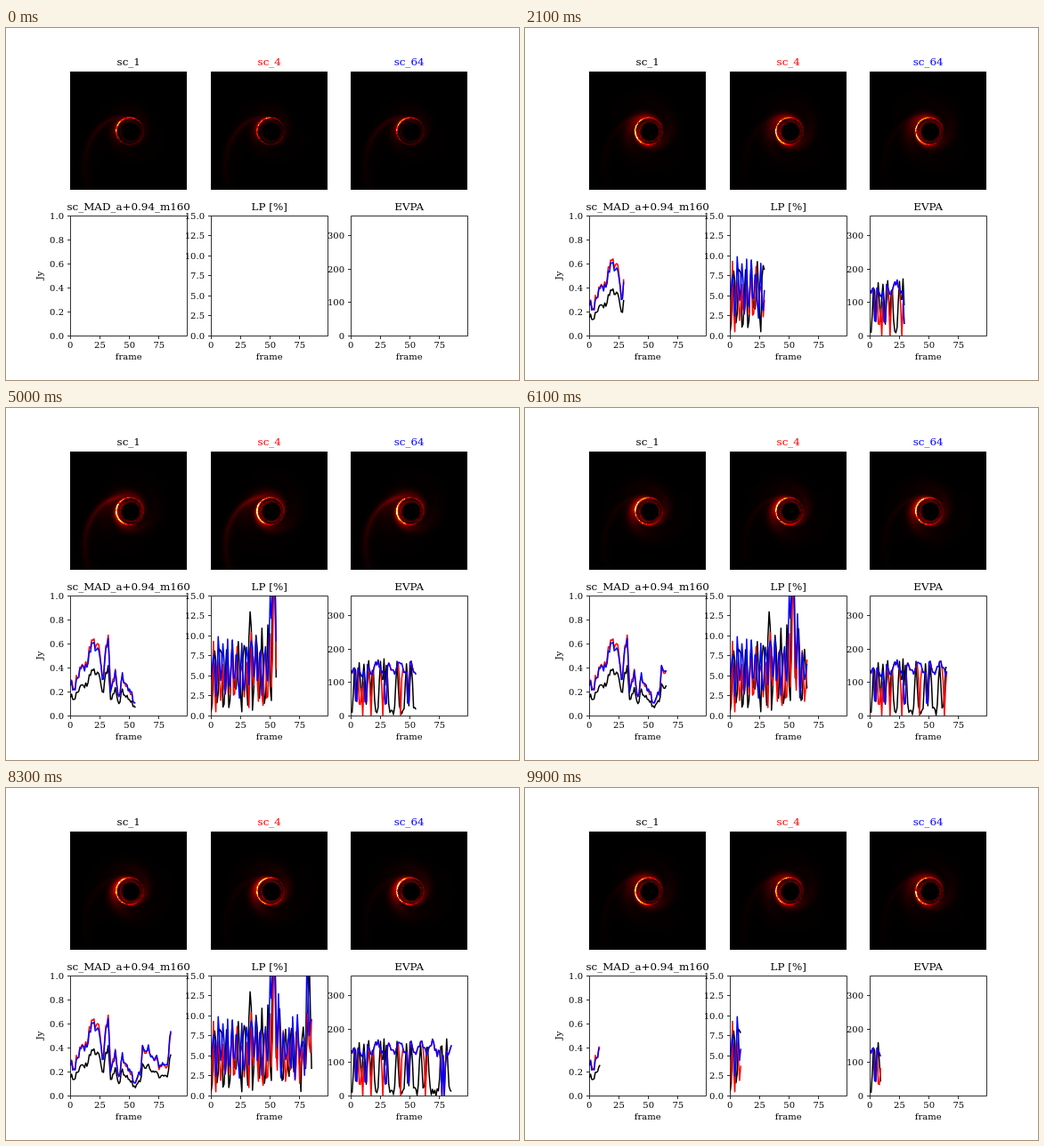
An HTML page with a canvas that plays this animation: 576 px wide and 396 px high, repeating every 10 s.

```html
<!DOCTYPE html>
<html lang="en">
<head>
<meta charset="utf-8">
<title>sc_MAD_a+0.94_m160</title>
<style>
html, body { margin: 0; width: 576px; height: 396px; overflow: hidden; background: #fff; }
canvas, svg { position: absolute; left: 0; top: 0; }
text { font: 10px "DejaVu Serif", "Noto Serif", serif; }
.title { font-size: 11.9px; }
.curve { fill: none; stroke-width: 1.5; stroke-linejoin: round; }
.axis { fill: none; stroke: #000; stroke-width: .8; }
</style>
</head>
<body>
<canvas width="576" height="396"></canvas>
<svg width="576" height="396"></svg>
<script>
const ctx = document.querySelector('canvas').getContext('2d');
const svg = document.querySelector('svg');
const LEFT = [72, 230, 387], W = 131, H = 133, TOP = 211, BOTTOM = 346;
const COLORS = ['#000', '#f00', '#00f'];

const bell = x => Math.exp(-x * x);

function rnd(x, y, seed) {
  let h = Math.imul(x + 1, 374761393) ^ Math.imul(y + 1, 668265263) ^ Math.imul(seed + 1, 1442695041);
  h = Math.imul(h ^ h >>> 13, 1274126177);
  h = Math.imul(h ^ h >>> 15, 2246822519);
  return ((h ^ h >>> 16) >>> 0) / 2 ** 32;
}
const jitter = (n, seed) => 2 * rnd(n, 0, seed) - 1;

// Linear interpolation through [x, y] points
function at(points, x) {
  const i = Math.max(1, points.findIndex(p => p[0] >= x));
  const [x0, y0] = points[i - 1], [x1, y1] = points[i];
  return y0 + (y1 - y0) * (x - x0) / (x1 - x0);
}

// Flux: one trend, scaled for each curve
const trend = [[0, .17], [3, .14], [9, .25], [14, .26], [19, .41], [22, .33], [24, .36], [27.5, .17], [30, .34],
  [32, .4], [34, .15], [38, .23], [41, .1], [44, .2], [55, .09], [59, .11], [61, .25], [67, .25], [76, .15], [82, .18], [85, .34], [99, .2]];
const flux = (n, scale, seed) => scale * (at(trend, n) + .025 * jitter(n, 5) + .008 * jitter(n, seed));

// Polarisation: a steady beat that swells three times
const swell = n => 1 + .4 * bell((n - 34) / 3) + 1.9 * bell((n - 53) / 3) + bell((n - 82) / 2);
const beat = (n, peak, period, mid, amp, seed) =>
  Math.max(.5, swell(n) * (mid + amp * Math.cos(2 * Math.PI * (n - peak) / period) + 1.8 * jitter(n, seed)));

// Angle: pulses above zero, or drops from a slow wave
const pulse = (n, centers, width) => Math.max(...centers.map(c => bell((n - c) / width)));
const spikes = [3.5, 7, 11, 15, 18.5, 25, 28, 30, 39, 47, 51, 59, 64.5, 76.5, 81];
const drops = [4.5, 12.5, 29.5, 48.5, 77, 79];
const redDrops = [...drops, 7.5, 10, 17, 27, 42, 63];
const wave = n => 145 + 18 * Math.sin(n * .68 - 1.2) + 10 * jitter(n, 8);

const charts = [
  { title: 'sc_MAD_a+0.94_m160', max: 1, step: .2, digits: 1,
    curves: [n => flux(n, 1, 1), n => flux(n, n < 40 ? 1.65 : 1.52, 2), n => flux(n, 1.57, 3)] },
  { title: 'LP [%]', max: 15, step: 2.5, digits: 1,
    curves: [n => beat(n, 3, 5, 5.4, 3.8, 1), n => beat(n, 6, 3.95, 4.8, 2.8, 2), n => beat(n, 6, 3.95, 6, 2.4, 3)] },
  { title: 'EVPA', max: 360, step: 100, digits: 0,
    curves: [n => 12 + 150 * pulse(n, spikes, 1.4) + 12 * jitter(n, 4),
      n => wave(n) * (1 - pulse(n, redDrops, .9)), n => wave(n) * (1 - pulse(n, drops, .9))] }
];

function add(tag, attrs, label = '') {
  const el = document.createElementNS('http://www.w3.org/2000/svg', tag);
  for (const key in attrs) el.setAttribute(key, attrs[key]);
  el.textContent = label;
  return svg.appendChild(el);
}
function write(x, y, label, anchor = 'middle', more = {}) {
  add('text', { x, y, 'text-anchor': anchor, ...more }, label);
}

charts.forEach((chart, c) => {
  const x0 = LEFT[c], mid = x0 + 65.7;
  const px = n => x0 + .3 + n * 1.327;
  const py = v => BOTTOM + .5 - v / chart.max * 135.5;
  write(mid, 42, ['sc_1', 'sc_4', 'sc_64'][c], 'middle', { class: 'title', fill: COLORS[c] });
  const clip = add('clipPath', { id: 'clip' + c });
  clip.append(add('rect', { x: x0, y: TOP, width: W, height: BOTTOM - TOP }));
  chart.paths = COLORS.map(stroke => add('polyline', { class: 'curve', stroke, 'clip-path': `url(#clip${c})` }));
  chart.points = (curve, n) =>
    Array.from({ length: n + 1 }, (_, i) => px(i).toFixed(2) + ',' + py(curve(i)).toFixed(2)).join(' ');

  let ticks = `M${x0 + .5} ${TOP + .5}h${W}v${BOTTOM - TOP}h${-W}z`;
  for (let n = 0; n < 99; n += 25) {
    ticks += `M${Math.floor(px(n)) + .5} ${BOTTOM + .5}v3.5`;
    write(px(n), 360, n);
  }
  for (let v = 0; v <= chart.max + .01; v += chart.step) {
    const y = Math.floor(py(v));
    ticks += `M${x0 + .5} ${y + .5}h-3.5`;
    write(x0 - 7, y + 4, v.toFixed(chart.digits), 'end');
  }
  add('path', { class: 'axis', d: ticks });
  write(mid, 373, 'frame');
  write(mid, 205, chart.title, 'middle', { class: 'title' });
});
write(0, 0, 'Jy', 'middle', { transform: 'translate(41 278.5) rotate(-90)' });

function drawRing(c, n) {
  const img = ctx.createImageData(W, H);
  const dim = bell(n / 5) + bell((n - 40) / 5);
  const gain = 1 - .35 * dim, halo = .75 - .45 * dim, dir = 1.5 - .6 * dim;
  const tail = .2 + .7 * bell((n - 55) / 6) + .25 * dim;
  for (let y = 0, p = 0; y < H; y++) for (let x = 0; x < W; x++, p += 4) {
    const dx = x - 66.5, dy = y - 66.5, r = Math.hypot(dx, dy) + .01;
    const inner = Math.hypot(dx - 1, dy - .5);
    const phi = Math.atan2(-dx, -dy); // 0 is up, positive to the left
    const side = ((1 + Math.cos(phi - dir)) / 2) ** 2;
    const grain = rnd(x, y, n * 3 + c);
    const clump = rnd(Math.floor(phi * 5 + 20), n, c);
    const wisp = .65 + .35 * Math.sin(2 * phi - 7 * Math.log(r) + n * .3);

    // Thin bright ring, faint second ring, glow around both
    let v = gain * bell((r - 15.2) / .75) * (.1 + .8 * side) * (.25 + .7 * clump + .7 * grain ** 3);
    v += .14 * halo * bell((inner - 11.5) / 1.3) * (.5 + grain);
    if (inner > 9) v += halo * .38 * Math.exp(-Math.abs(r - 15) / (r < 15 ? 3 : 4.5)) * (.2 + side) * wisp;
    if (r > 14) v += halo * .1 * Math.exp((14 - r) / 10) * wisp;

    // Arm that leaves the top and falls to the lower left
    if (r > 14 && phi > 0) {
      const arm = 18 + 6.8 * phi ** 2.4;
      const fade = Math.min(1, phi) * Math.max(0, 1 - (phi / 2.9) ** 4);
      const inside = r < arm ? .35 * Math.exp((r - arm) / 15) : 0;
      v += tail * .14 * fade * (bell((r - arm) / (1.5 + 1.5 * phi)) + inside) * Math.exp(-r / 70);
    }
    img.data[p] = 255 * v / .365;
    img.data[p + 1] = 255 * (v - .365) / .38;
    img.data[p + 2] = 255 * (v - .746) / .254;
    img.data[p + 3] = 255;
  }
  ctx.putImageData(img, LEFT[c], 49);
}

// Steps run in name order: 0, 10 to 19, 1, 20 to 29, 2, ...
function frameAt(step) {
  if (!step) return 0;
  const tens = Math.floor((step - 1) / 11) + 1, unit = (step - 1) % 11;
  return unit < 10 ? tens * 10 + unit : tens;
}

let shown = -1;
function tick() {
  const n = frameAt(Math.floor(performance.now() / 100) % 100);
  if (n !== shown) {
    shown = n;
    charts.forEach((chart, c) => {
      drawRing(c, n);
      chart.paths.forEach((path, i) => path.setAttribute('points', n ? chart.points(chart.curves[i], n) : ''));
    });
  }
  requestAnimationFrame(tick);
}
tick();
</script>
</body>
</html>
```
